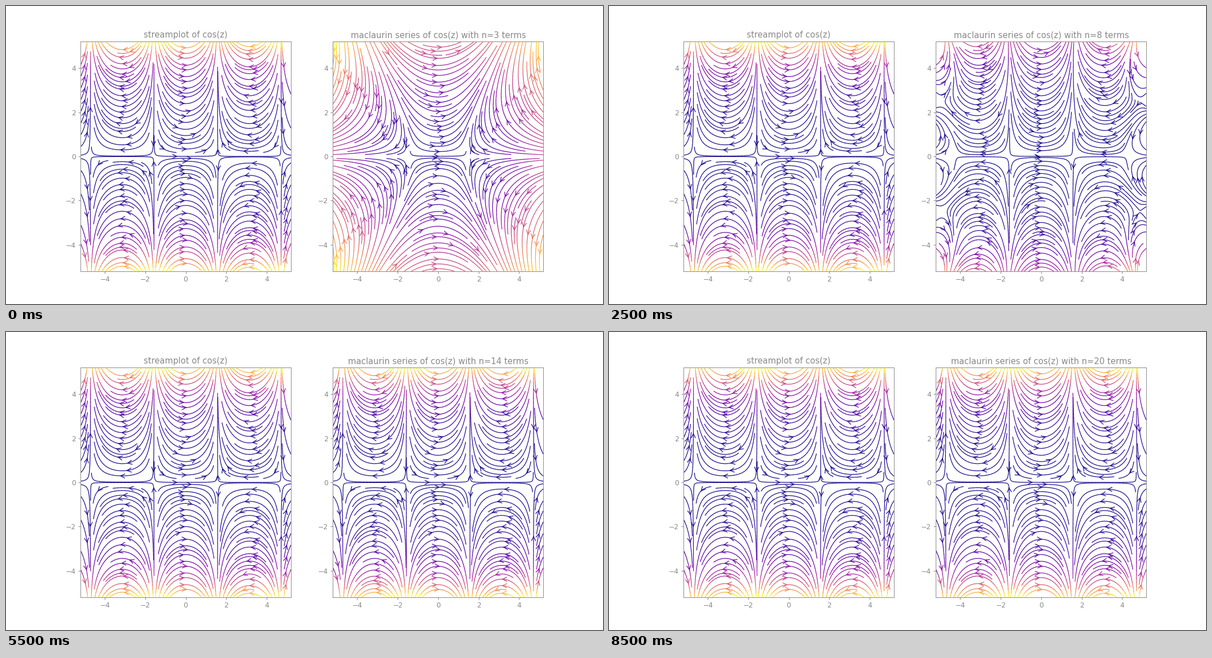
Write a matplotlib script that moves like this. It is 1058x529 px and loops after 9 s.

```python
import math

import numpy as np
import matplotlib.pyplot as plt
from matplotlib.animation import FuncAnimation

WIDTH, HEIGHT = 1058, 529
DPI = WIDTH / 12
LIMIT = 5.2
FIRST_N, LAST_N = 3, 20
GREY = "#888888"

axis = np.linspace(-LIMIT, LIMIT, 100)
X, Y = np.meshgrid(axis, axis)
Z = X + 1j * Y


def maclaurin(z, degree):
    """Partial sum of the cosine series up to the given power."""
    return sum((-1) ** (k // 2) * z**k / math.factorial(k)
               for k in range(0, degree + 1, 2))


def style(ax, title):
    ax.set_xlim(-LIMIT, LIMIT)
    ax.set_ylim(-LIMIT, LIMIT)
    ax.tick_params(colors=GREY)
    for spine in ax.spines.values():
        spine.set_color(GREY)
    return ax.set_title(title, color=GREY)


def draw_flow(ax, w):
    """Plot the conjugate field of w and return the new artists."""
    count = len(ax.patches)
    stream = ax.streamplot(X, Y, w.real, -w.imag, color=np.abs(w),
                           cmap="plasma", density=2, linewidth=1,
                           arrowstyle="->", arrowsize=1.5)
    return [stream.lines, *list(ax.patches)[count:]]


plt.rcParams["font.family"] = "DejaVu Sans"
fig, (left, right) = plt.subplots(1, 2, figsize=(WIDTH / DPI, HEIGHT / DPI),
                                  dpi=DPI, facecolor="white")

draw_flow(left, np.cos(Z))
flows = {d: draw_flow(right, maclaurin(Z, d))
         for d in range(FIRST_N - FIRST_N % 2, LAST_N + 1, 2)}
style(left, "streamplot of cos(z)")
heading = style(right, "")


def update(i):
    n = FIRST_N + i
    heading.set_text(f"maclaurin series of cos(z) with n={n} terms")
    # Odd powers vanish, so the field only changes on even n.
    for degree, artists in flows.items():
        for artist in artists:
            artist.set_visible(degree == n - n % 2)
    return [heading]


anim = FuncAnimation(fig, update, frames=LAST_N - FIRST_N + 1,
                     init_func=lambda: update(0), interval=500,
                     repeat=True, repeat_delay=0, blit=False)
plt.show()
```
